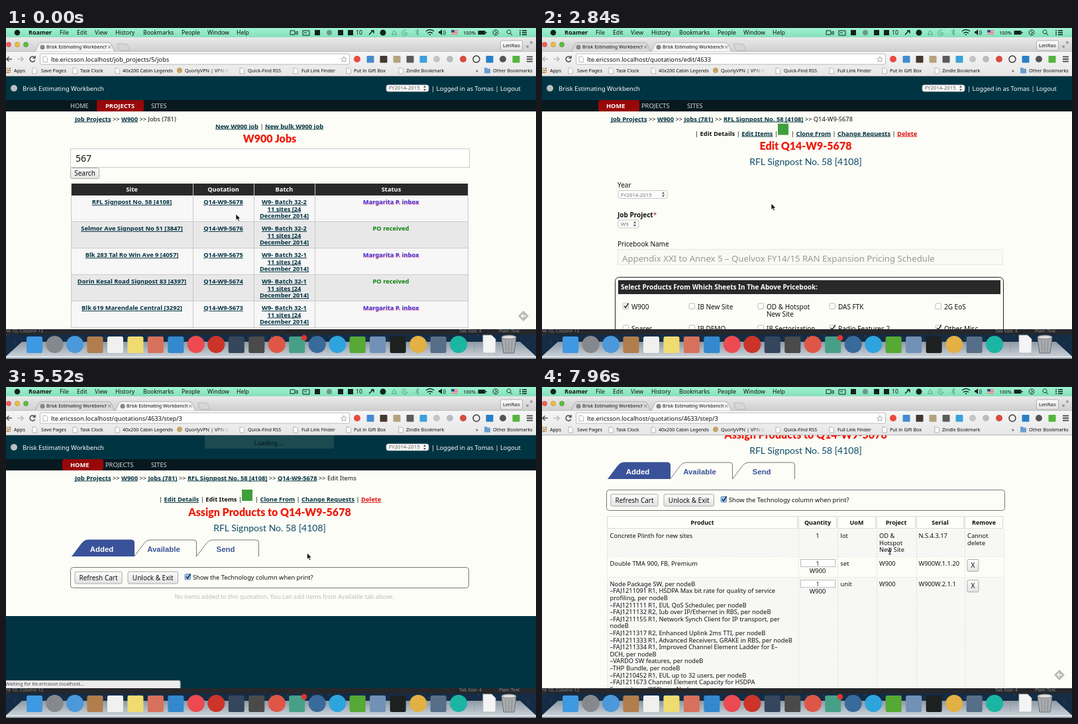
Animation of 800 by 500 pixels, one loop 8 s. Source, as an HTML page:

```html
<!DOCTYPE html>
<html lang="en">
<head>
<meta charset="utf-8">
<title>Quotation walkthrough</title>
<style>
html, body { margin: 0; width: 100%; height: 100%; overflow: hidden; }
#stage { display: block; width: 800px; height: 500px; font: 9.3px 'Noto Sans', 'Open Sans', sans-serif; fill: #111; }
.b { font-weight: 700; }
.m { text-anchor: middle; }
.l { font-weight: 700; fill: #00303f; text-decoration: underline; }
.hover { fill: #2a7590; text-decoration: none; }
.h1 { font: 900 16px Lato, sans-serif; fill: #ee1c0c; text-anchor: middle; }
.h2 { font: 14px Lato, sans-serif; fill: #0e4a68; text-anchor: middle; }
.tab { font: 700 11.4px 'Liberation Sans', Arial, sans-serif; text-anchor: middle; }
.inbox { fill: #3d3de0; text-shadow: .6px .6px 1px #f79; }
</style>
</head>
<body>
<svg id="stage" viewBox="0 0 800 500"></svg>
<script>
const APP = 'Brisk Estimating Workbench', SITE = 'RFL Signpost No. 58 [4108]', QUOTE = 'Q14-W9-5678';
const HOST = 'lte.ericsson.localhost', PAPER = '#fcfdf6', TEAL = '#003442', BLUE = '#3a5299';

const text = (x, y, s, a = '') => `<text x="${x}" y="${y}" ${a}>${s}</text>`;
const mid = (x, y, s, c = '', a = '') => text(x, y, s, `class="m ${c}" ${a}`);
const rect = (x, y, w, h, fill, a = '') => `<rect x="${x}" y="${y}" width="${w}" height="${h}" fill="${fill}" ${a}/>`;
const dot = (x, y, r, fill, a = '') => `<circle cx="${x}" cy="${y}" r="${r}" fill="${fill}" ${a}/>`;
const path = (d, stroke, a = '') => `<path d="${d}" fill="none" stroke="${stroke}" ${a}/>`;
const group = (id, s, a = '') => `<g id="${id}" ${a}>${s}</g>`;
const link = s => `<tspan class="l">${s}</tspan>`;
const bold = s => `<tspan class="b">${s}</tspan>`;
const lines = (x, y, list, a = '', step = 10.6) => list.map((s, i) => text(x, y + i * step, s, a)).join('');
const crumbs = list => text(104, 140.5, list.map((s, i) => i < list.length - 1 ? link(s) : s).join(' &gt;&gt; '));
const button = (x, y, w, h, s, size = 10) =>
  rect(x, y, w, h, 'url(#btn)', 'rx="2" stroke="#aaa"') + mid(x + w / 2, y + h / 2 + size * .36, s, '', `font-size="${size}"`);
const select = (x, y, w, h, s, fill = '#555') =>
  rect(x, y, w, h, '#fbfbfb', 'rx="3" stroke="#bbb" stroke-width=".8"') + text(x + 4, y + h - 3, s, `font-size="7.8" fill="${fill}"`) +
  `<path d="M${x + w - 8} ${y + h / 2 - 1}l2-3 2 3zm0 2l2 3 2-3z" fill="#555"/>`;
const check = (x, y, on, fill = '#fff', stroke = '#aaa') => rect(x, y, 8.5, 8.5, fill, `rx="1.5" stroke="${stroke}" stroke-width=".8"`) +
  (on ? path(`M${x + 2} ${y + 4}l2.2 2.6 4.4-7`, '#223', 'stroke-width="1.5"') : '');
const doc = (x, y) => `<path d="M${x - 3} ${y - 4}h4l2.5 2.5v6h-6.5z" fill="#fff" stroke="#999" stroke-width=".7"/>`;

// ---------- browser and system chrome ----------
function menuBar() {
  const items = [[81, 'File'], [107, 'Edit'], [134, 'View'], [165, 'History'], [207, 'Bookmarks'], [265, 'People'], [304, 'Window'], [348, 'Help']];
  const ink = '#122';
  return rect(0, 0, 800, 14, 'url(#menu)') + dot(17, 7, 4.3, ink) + text(34, 10, 'Roamer', 'class="b" font-size="9"') +
    items.map(([x, s]) => text(x, 10, s, 'font-size="8.7"')).join('') +
    path('M429 4h7v6h-7zM437 7l3-2v5l-3-2M448 4h10v7h-10zM450 7h4', ink) +
    rect(466, 3, 8, 8, ink) + dot(488, 7, 4, '#68998a') + rect(501, 3, 8, 8, ink) + rect(516, 3, 8, 8, ink) +
    text(528, 10, '10', 'font-size="8.7"') + path('M548 10l6-6M551 4h4v4', ink, 'stroke-width="1.5"') + dot(569, 7, 4.5, ink) +
    path('M582 10h8q-2-1-2-4-2-4-4 0 0 3-2 4M606 7a4 4 0 1 1-2-3.5M602 5v3h2M618 4l5 5-2 2v-9l2 2-5 5', '#5d9a83') +
    path('M634 5q6-5 12 0M636 8q4-3 8 0M639 10h2', ink, 'stroke-width="1.5"') +
    `<path d="M653 5h2l3-3v9l-3-3h-2z" fill="${ink}"/>` + path('M660 4q2 3 0 6M662 3q3 4 0 8', ink, 'stroke-width=".8"') +
    rect(672, 3, 10, 7, '#f3dcdc') + path('M672 4h10M672 6.5h10M672 9h10', '#cc4048') + rect(672, 3, 5, 4, '#36508c') +
    text(690, 9.7, '100%', 'font-size="7.5"') + rect(712.5, 4, 11, 6, ink, 'rx="1"') + rect(724, 6, 1.5, 2, ink) +
    path('M743 7a4 4 0 1 1-.01-.5M738 5l3 2-3 2M762 6a3 3 0 1 1-.01-.4M761 8l3 3', ink) +
    path('M775 4h2M779 4h7M775 7h2M779 7h7M775 10h2M779 10h7', ink, 'stroke-width="1.4"');
}

function toolbar() {
  const ext = [['c', '#e84a3c'], ['r', '#438bd0'], ['r', '#44382f'], ['r', '#b3a27d'], ['r', '#5b5b5b'], ['r', '#3ba2da'], ['c', '#c4c4c4'],
    ['c', '#b9bdc0'], ['c', '#d94a40'], ['o', '#333'], ['r', '#2880c8'], ['c', '#555'], ['r', '#55b53e']];
  const marks = [[53, 'Save Pages', 43], [112, 'Task Clock', 104], [176, '40x200 Cabin Legends', 168], [365, 'Quick-Find RSS', 356],
    [446, 'Full Link Finder', 437], [525, 'Put in Gift Box', 517], [604, 'Zindle Bookmark', 596]];
  return rect(0, 36, 800, 37, 'url(#bar)') + rect(51.5, 39, 467, 16, '#fff', 'rx="2" stroke="#bbb"') + doc(59, 47) +
    path('M510 43l1.2 3 3.2.2-2.4 2 .8 3.1-2.8-1.7-2.8 1.7.8-3.1-2.4-2 3.2-.2z', '#999', 'stroke-width=".8"') +
    ext.map(([k, c], i) => {
      const x = 530 + i * 20;
      return k === 'r' ? rect(x - 5.5, 42, 11, 10.5, c, 'rx="1"') : dot(x, 47, 5, k === 'o' ? 'none' : c, k === 'o' ? `stroke="${c}" stroke-width="1.4"` : '');
    }).join('') + path('M786 43.5h9M786 47h9M786 50.5h9', '#555', 'stroke-width="1.8"') +
    [0, 1, 2].map(i => [0, 1, 2].map(j => rect(i * 3 - 1, 60 + j * 3, 2, 2, ['#d44', '#d9a520', '#4a9d4a'][(i + j) % 3])).join('')).join('') +
    `<g font-size="7.2">${text(12, 67.3, 'Apps') + marks.map(([x, s, ix]) => doc(ix, 64.5) + text(x, 67.3, s)).join('') +
      dot(262, 64, 4, '#c6a365') + text(270, 67.3, 'QuorlyVPN | VPN IP', 'fill="url(#fade)"') + text(709, 67, '»') +
      `<path d="M722 60h4l1 1.5h4v7h-9z" fill="#6a9fd0"/>` + text(735, 67.3, 'Other Bookmarks')}</g>` + rect(0, 72, 800, 1, '#b5b5b5');
}

function titleStrip() {
  return rect(0, 14, 800, 22, 'url(#strip)') +
    [['#fb5a54', 4], ['#e8bd3a', 17], ['#58bf3c', 30]].map(([c, x]) => dot(x, 25, 3.7, c, 'stroke="#0004" stroke-width=".6"')).join('') +
    rect(746.5, 19, 33, 15, 'url(#btn)', 'rx="2" stroke="#b0b0b0"') + mid(763, 29, 'LenRao', '', 'font-size="7.4"') +
    path('M786 29l3-3M786 26v3h3M791 24l3-3M791 21h3v3', '#777');
}

function tab(x, w, active, busy) {
  const r = x + w;
  const shape = `M${x} 36q3 0 4-4l3-7q1-3 5-3H${r - 12}q4 0 5 3l3 7q1 4 4 4`;
  if (w < 30) return '';
  return `<path d="${shape}" fill="${active ? '#f5f5f5' : '#dadada'}" stroke="#a5a5a5" stroke-width=".8"/>` +
    (busy ? path(`M${x + 16} 29a4 4 0 1 1-4-4`, '#6b8fb5', 'stroke-width="1.5"') : dot(x + 13, 29, 3.6, '#81898d')) +
    `<svg x="${x + 19}" y="20" width="${Math.max(0, w - 33)}" height="16">${text(0, 11.4, APP, 'font-size="7"')}</svg>` +
    path(`M${r - 12} 26.5l4.5 4.5m0-4.5l-4.5 4.5`, '#777');
}

function dock() {
  const icons = ['#3f98e2', 'c#85898e', 'c#4b98da', '#b17d4c', '#f0f0ee', '#f0db70', '#d8715c', '#3488cd', 'c#ec4a50', 'c#cc3329', '#35465c',
    '#4a4a4a', 'c#df5646', '#46a087', 'c#386a9c', 'c#2ea4de', '#55a934', '#7191b6', '#1d211f', 'c#e2b043', '#566e88', 'c#1bb5a4'];
  const stars = Array.from({ length: 110 }, (_, i) => rect((i * 137.5) % 800, 463 + (i * 23.7) % 16, 1, 1, i % 3 ? '#31506e' : '#6f8ba5')).join('');
  return rect(0, 455, 800, 45, '#142c46') + rect(0, 455, 800, 8, '#25272a') +
    `<g font-size="7" fill="#8a8a8a">${text(-1, 460, 'ne 10, Column 12') + text(684, 460, 'Tab Size: 4') + text(744, 460, 'Plain Text')}</g>` + stars +
    '<path d="M24 474H776L800 496H0z" fill="url(#shelf)"/>' + rect(0, 496, 800, 2, '#e4e9ed') + rect(0, 498, 800, 2, '#8b959e') +
    icons.map((c, i) => {
      const x = 43 + i * 30.48;
      return c[0] === 'c' ? dot(x, 478, 13, c.slice(1)) : rect(x - 12, 466, 24, 25, c, 'rx="2.5"');
    }).join('') + dot(450, 468, 4.2, '#e5342c') + path('M707 476v16', '#8b9299', 'stroke-dasharray="2"') +
    '<path d="M720 464h13l6 6v21h-19z" fill="#f4f4f4" stroke="#bbb"/><path d="M748 467h22l-3 24h-16z" fill="#a9adaf" stroke="#696d70"/>' +
    '<ellipse cx="759" cy="467" rx="11" ry="3" fill="#dcdcdc" stroke="#777"/>' + path('M754 472l1 17M759 472v17M764 472l-1 17', '#85898c');
}

// ---------- web pages ----------
function head(active) {
  const items = [['HOME', 97, 85, 62], ['PROJECTS', 150, 137, 71], ['SITES', 219, 0, 0]];
  return rect(0, 73, 800, 36, TEAL) + dot(12, 91, 5, '#b8c2c0') + text(25, 95, APP, 'fill="#fff"') +
    select(574, 86, 64, 10, 'FY2014-2015') + text(642, 95, '| Logged in as Tomas | Logout', 'fill="#fff"') + rect(0, 109, 800, 17, '#07191f') +
    items.map(([s, x, bx, bw], i) => (i === active ? rect(bx, 109, bw, 17, '#980808', 'rx="3"') : '') +
      text(x, 121, s, i === active ? 'class="b" fill="#fff"' : 'fill="#d5dcdc"')).join('');
}

function jobsPage() {
  const rows = [[SITE, 5678, 2], ['Selmor Ave Signpost No 51 [3847]', 5676, 2], ['Blk 283 Tal Ro Win Ave 9 [4057]', 5675, 1],
    ['Dorin Kesal Road Signpost 83 [4397]', 5674, 1], ['Blk 619 Marendale Central [3292]', 5673, 1]];
  const cols = [98, 282, 374, 466, 697], centre = i => (cols[i] + cols[i + 1]) / 2;
  return head(1) + crumbs(['Job Projects', 'W900', 'Jobs (781)']) +
    mid(397.5, 151.5, link('New W900 job') + ' | ' + link('New bulk W900 job')) + text(398, 173, 'W900 Jobs', 'class="h1"') +
    rect(97.5, 182.5, 602, 28, '#fffffc', 'stroke="#ccc"') + text(105, 202, '567', 'font-size="14"') + button(97.5, 211.5, 43, 16, 'Search') +
    rect(98, 235, 599, 18, '#292929') + ['Site', 'Quotation', 'Batch', 'Status'].map((s, i) => mid(centre(i), 247, s, 'b', 'fill="#fff"')).join('') +
    rows.map(([site, q, batch], i) => {
      const y = 253 + i * 40;
      return rect(98, y, 599, 40, i % 2 ? '#e8e8e8' : '#f7f7f7') + path(`M98 ${y + 39.5}H697`, '#ccc') +
        mid(190, y + 13, link(site)) + mid(328, y + 13, `<tspan class="l" ${i ? '' : 'id="quoteLink"'}>Q14-W9-${q}</tspan>`) +
        lines(420, y + 13, [`W9- Batch 32-${batch}`, '11 sites [24', 'December 2014]'], 'class="m l"', 10.5) +
        mid(581, y + 13, i % 2 ? 'PO received' : 'Margarita P. inbox', i % 2 ? 'b' : 'b inbox', i % 2 ? 'fill="#0a800a"' : '');
    }).join('') + cols.map(x => path(`M${x + .5} 235V454`, '#c8c8c8')).join('');
}

function actions(y, details, items) {
  return text(231, y, `| ${details} | ${items} |`) + rect(356, y - 18, 16, 17, '#3f9f3c') +
    text(376, y, `| ${link('Clone From')} | ${link('Change Requests')} | <tspan class="l" style="fill:#e01010">Delete</tspan>`);
}

function editPage() {
  const boxes = [[122, 'W900', 1], [222, 'IB New Site'], [326, 'OD &amp; Hotspot'], [434, 'DAS FTK'], [594, '2G EoS']];
  const more = [[122, 'Spares'], [222, 'IB DEMO'], [326, 'IB Sectorization'], [434, 'Radio Features 2', 1], [594, 'Other Misc', 1]];
  const row = (list, y) => list.map(([x, s, on]) => check(x, y - 9, on) + text(x + 13, y, s)).join('');
  return head(0) + crumbs(['Job Projects', 'W900', 'Jobs (781)', SITE, QUOTE]) +
    actions(162.5, bold('Edit Details'), '<tspan class="l" id="itemsLink">Edit Items</tspan>') +
    text(398, 184, 'Edit ' + QUOTE, 'class="h1"') + text(398, 207, SITE, 'class="h2"') +
    `<g font-size="10">${text(114, 241, 'Year') + text(114, 286, bold('Job Project') + '<tspan fill="#a33">*</tspan>') + text(114, 330, 'Pricebook Name') +
      select(115, 245.5, 74, 12, 'FY2014-2015', '#777') + select(115, 290, 31, 12, 'W9', '#777') +
      rect(114.5, 334.5, 581, 23, '#f9faf2', 'stroke="#e6e6e0"') +
      text(121, 352.5, 'Appendix XXI to Annex 5 – Quelvox FY14/15 RAN Expansion Pricing Schedule', 'font-size="13.2" fill="#999"') +
      rect(110.5, 376.5, 586, 110, 'none', 'rx="6" stroke="#222"') + rect(115, 381, 577, 21, '#292929') +
      text(119, 395, 'Select Products From Which Sheets In The Above Pricebook:', 'class="b" fill="#fff"') +
      row(boxes, 425) + text(339, 436, 'New Site') + row(more, 458)}</g>`;
}

function itemTable() {
  const cols = [98, 387, 446, 505, 565, 638, 697];
  const node = ['Node Package SW, per nodeB', '–FAJ1211091 R1, HSDPA Max bit rate for quality of service', 'profiling, per nodeB',
    '–FAJ1211111 R1, EUL QoS Scheduler, per nodeB', '–FAJ1211132 R2, Iub over IP/Ethernet in RBS, per nodeB',
    '–FAJ1211155 R1, Network Synch Client for IP transport, per', 'nodeB', '–FAJ1211317 R2, Enhanced Uplink 2ms TTI, per nodeB',
    '–FAJ1211333 R1, Advanced Receivers, GRAKE in RBS, per nodeB', '–FAJ1211334 R1, Improved Channel Element Ladder for E–', 'DCH, per nodeB',
    '–VARDO SW features, per nodeB', '–THP Bundle, per nodeB', '–FAJ1210452 R1, EUL up to 32 users, per nodeB',
    '–FAJ1211673 Channel Element Capacity for HSDPA', 'Smartphone (800), per Node'];
  const row = (y, name, unit, project, serial, fixed) => lines(102.5, y, name) + text(450.5, y, unit) + lines(509, y, project) + text(568.5, y, serial) +
    (fixed ? mid(416, y, '1') + lines(642, y, ['Cannot', 'delete'])
      : rect(390.5, y - 9, 52, 11, '#fff', 'stroke="#bbb"') + mid(416, y, '1', '', 'font-size="8"') + mid(416, y + 11, 'W900') + button(642, y - 9, 17, 18, 'X'));
  return rect(98, 332, 599, 41, '#f7f8f5') + rect(98, 404, 599, 260, '#f7f8f5') +
    ['Product', 'Quantity', 'UoM', 'Project', 'Serial', 'Remove'].map((s, i) =>
      rect(cols[i] + .5, 312.5, cols[i + 1] - cols[i] - 2, 18, '#fefefa', 'stroke="#d8d8d8"') + mid((cols[i] + cols[i + 1]) / 2 - .5, 325, s, 'b', 'font-size="9"')).join('') +
    cols.map(x => path(`M${x + .5} 332V660`, '#d9d9d9', 'stroke-dasharray="1.5"')).join('') +
    path('M98 373.5H697M98 404.5H697', '#e2e2de', 'stroke-dasharray="1.5"') +
    row(345, ['Concrete Plinth for new sites'], 'lot', ['OD &amp;', 'Hotspot', 'New Site'], 'N.S.4.3.17', true) +
    row(386.5, ['Double TMA 900, FB, Premium'], 'set', ['W900'], 'W900W.1.1.20') + row(417.7, node, 'unit', ['W900'], 'W900W.2.1.1');
}

function stepPage() {
  const shape = (x, fill, stroke) => `<path d="M${x} 256l15-20q4-5 9-5h66q4 0 4 4v21" fill="${fill}" stroke="${stroke}"/>`;
  return head(0) + crumbs(['Job Projects', 'W900', 'Jobs (781)', SITE, QUOTE, 'Edit Items']) + actions(173, link('Edit Details'), bold('Edit Items')) +
    text(398, 194.5, 'Assign Products to ' + QUOTE, 'class="h1"') + text(398, 217.5, SITE, 'class="h2"') +
    shape(193.5, 'none', '#777') + shape(287.5, 'none', '#777') + shape(99.5, BLUE, BLUE) +
    text(144.5, 249, 'Added', 'class="tab" fill="#fff"') + text(238, 249, 'Available', `class="tab" fill="${BLUE}"`) + text(331.5, 249, 'Send', `class="tab" fill="${BLUE}"`) +
    rect(97.5, 272.5, 601, 31, 'none', 'rx="4" stroke="#777"') + button(104, 279, 71, 18, 'Refresh Cart') + button(184, 279, 75.5, 18, 'Unlock &amp; Exit') +
    check(270, 282.5, true, '#94c1f0', '#4a7fb8') + text(282, 291.3, 'Show the Technology column when print?') +
    group('empty', mid(420, 319.5, 'No items added to this quotation. You can add items from Available tab above.', '', 'font-size="9" fill="#bbb"') + rect(0, 346, 800, 110, TEAL)) +
    group('items', itemTable());
}

const gradient = (id, a, b) => `<linearGradient id="${id}" x2="0" y2="1"><stop stop-color="${a}"/><stop offset="1" stop-color="${b}"/></linearGradient>`;
const stage = document.getElementById('stage');
stage.innerHTML = `<defs>${gradient('menu', '#9df2cf', '#86dfba') + gradient('strip', '#e9e9e9', '#cfcfcf') + gradient('bar', '#f5f5f5', '#e6e6e6') +
  gradient('btn', '#fdfdfd', '#e3e3e3') + gradient('shelf', '#8d99a5', '#c9d0d7')}
  <linearGradient id="fade"><stop offset=".7" stop-color="#111"/><stop offset="1" stop-color="#111" stop-opacity="0"/></linearGradient>
  <clipPath id="view"><rect y="73" width="800" height="382"/></clipPath></defs>` +
  dock() + menuBar() + titleStrip() + group('tabs', '') + toolbar() + text(68, 50.5, '', 'id="url"') +
  path('M9 47H1M4.5 43.5L1 47l3.5 3.5', '#555', 'id="back" stroke-width="1.7"') + path('M18 47h8M22.5 43.5L26 47l-3.5 3.5', '#bbb', 'stroke-width="1.7"') +
  path('M43.5 45a4 4 0 1 0 .3 3.5M44 42v3.5h-3.5', '#555', 'id="reload" stroke-width="1.6"') + path('M36.5 43.5l7 7m0-7l-7 7', '#555', 'id="stop" stroke-width="1.8"') +
  `<g clip-path="url(#view)">${rect(0, 73, 800, 382, PAPER) + group('jobs', jobsPage()) + group('edit', editPage()) + group('step', stepPage()) +
    group('banner', rect(300, 73, 195, 20, '#1c4a50') + mid(396, 87.5, 'Loading...', '', 'fill="#001418"')) +
    group('feedback', '<path d="M781 427l8 8-8 8-8-8z" fill="#b9bab6"/>' + path('M785 435h-7m3-3l-3 3 3 3', '#fff', 'stroke-width="1.3"')) +
    group('status', rect(-2, 443.5, 265, 14, '#ececec', 'rx="2" stroke="#b5b5b5"') + text(-1, 451.3, '', 'id="statusText" font-size="7.4" fill="#444"'))}</g>` +
  group('arrow', '<path d="M0 0v9.5l2.2-2 1.6 3.6 1.7-.8-1.6-3.4h3z" fill="#111" stroke="#fff" stroke-width=".7"/>') +
  group('hand', '<path d="M2 1q1.3-1.3 2 0v4q3-.7 5 1v2q0 3-1.5 4H3.5L0 7.5q0-1.5 2-.5z" fill="#fff" stroke="#222" stroke-width=".9"/>') +
  group('beam', path('M-2 0q2 0 2 1.5Q0 0 2 0M0 1v8M-2 10q2 0 2-1.5 0 1.5 2 1.5M-1.5 6h3', '#222'));

// ---------- timeline ----------
const el = id => document.getElementById(id);
const show = (id, on) => { el(id).style.display = on ? '' : 'none'; };
const ramp = (t, a, b) => Math.min(1, Math.max(0, (t - a) / (b - a)));
const between = (t, a, b) => t >= a && t < b;
const pointer = [[0, 347, 281], [1000, 347, 281], [1440, 346, 265], [2880, 346, 265], [3040, 338, 246], [3400, 338, 246], [3720, 321, 163], [4240, 321, 163],
  [4880, 357, 256], [5080, 357, 256], [5880, 526, 247], [7000, 526, 247], [7160, 527, 242], [7800, 527, 242], [7960, 525, 243], [8000, 525, 243]];

function pointerAt(t) {
  const i = pointer.findIndex(p => p[0] > t), [ta, xa, ya] = pointer[i - 1], [tb, xb, yb] = pointer[i];
  const u = ramp(t, ta, tb), k = u * u * (3 - 2 * u);
  return [xa + (xb - xa) * k, ya + (yb - ya) * k];
}

function draw(t) {
  const onQuote = between(t, 1240, 2040), onItems = between(t, 3560, 4280);
  const busy = between(t, 2040, 2480) || between(t, 3760, 4280), loaded = t >= 5560;
  show('jobs', t < 2040);
  show('edit', between(t, 2400, 4280));
  show('step', t >= 4280);
  show('empty', !loaded);
  show('items', loaded);
  show('feedback', t < 2040 || between(t, 2960, 4280) || t >= 5880);
  show('stop', busy);
  show('reload', !busy);
  el('back').setAttribute('stroke', between(t, 2040, 4280) ? '#bbb' : '#555');
  el('url').textContent = HOST + (t < 2040 ? '/job_projects/5/jobs' : t < 4280 ? '/quotations/edit/4633' : '/quotations/4633/step/3');
  el('quoteLink').classList.toggle('hover', onQuote);
  el('itemsLink').classList.toggle('hover', onItems);

  const waiting = between(t, 4280, 5560);
  show('status', onQuote || onItems || waiting);
  el('statusText').textContent = waiting ? `Waiting for ${HOST}...` : HOST + (onQuote ? '/quotations/edit/4633' : '/quotations/4633/step/3');

  const grow = 121 * ramp(t, 2060, 2260), newX = 168 + grow;
  el('tabs').innerHTML = `<path d="M${newX} 24h13q2 0 3 3l3 7h-13q-2 0-3-3z" fill="#d6d6d6" stroke="#aaa" stroke-width=".7"/>` +
    tab(42, 124, grow < 30, false) + tab(163, grow + 4, true, busy) + rect(0, 35.6, 800, .6, '#b0b0b0');

  const scroll = 117 * (1 - (1 - ramp(t, 7000, 7560)) ** 6);
  el('step').setAttribute('transform', `translate(0 ${-scroll})`);
  el('banner').style.opacity = ramp(t, 5080, 5280) * (1 - ramp(t, 5900, 6720));

  const kind = t >= 7060 ? 'beam' : onQuote || onItems || between(t, 4700, 5160) ? 'hand' : 'arrow';
  for (const id of ['arrow', 'hand', 'beam']) show(id, id === kind);
  el(kind).setAttribute('transform', `translate(${pointerAt(t)})`);
}

const start = performance.now();
function tick() {
  draw((performance.now() - start) % 8000);
  requestAnimationFrame(tick);
}
draw(0);
requestAnimationFrame(tick);
</script>
</body>
</html>
```
